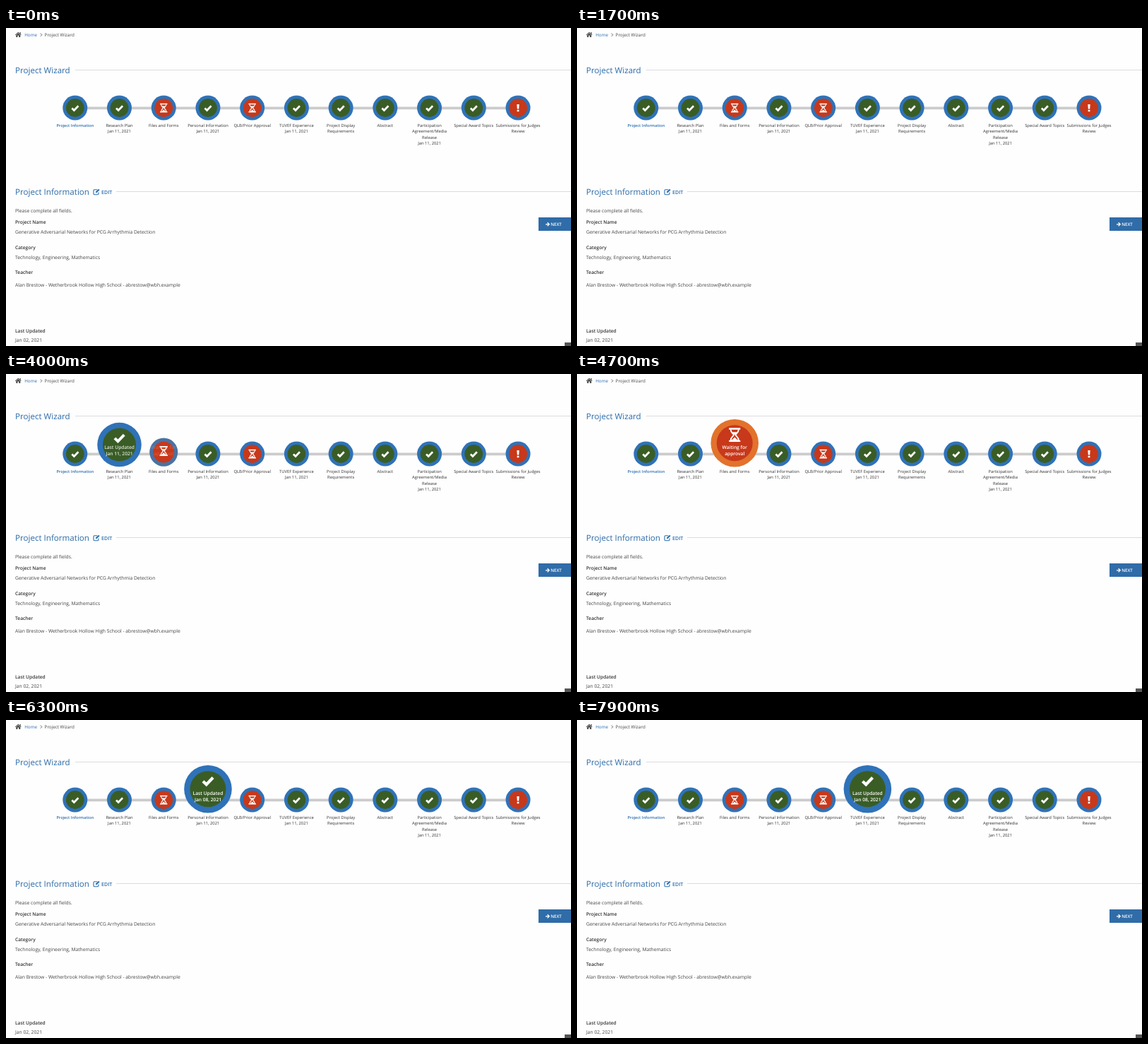
An HTML page for the animation above (8000 ms loop, 800 px wide and 450 px high).

```html
<!DOCTYPE html>
<html lang="en">
<head>
<meta charset="utf-8">
<title>Project Wizard</title>
<style>
  html, body { margin: 0; width: 100%; height: 100%; overflow: hidden; background: #fefefe; }
  svg { display: block; width: 800px; height: 450px; }
  text { font-family: "Open Sans", "Noto Sans", sans-serif; font-size: 6.75px; fill: #444; text-rendering: geometricPrecision; }
  .heading { font-size: 11.6px; fill: #2a6aa8; }
  .crumb { font-size: 6.3px; }
  .strong { font-weight: 600; font-size: 6.67px; fill: #333; }
  .label { font-size: 5.83px; text-anchor: middle; fill: #333; }
  .current { font-size: 5.6px; font-weight: 600; fill: #2a6db0; }
  .note { font-size: 6.67px; font-weight: 600; text-anchor: middle; fill: #fff; }
</style>
</head>
<body>
<svg id="stage" viewBox="0 0 800 450">
  <rect width="800" height="450" fill="#fefefe"/>

  <path d="M13 9.6L17.3 5.8L21.6 9.6L21 10.2L17.3 7L13.6 10.2ZM19.6 6H20.8V8.4L19.6 7.4ZM14.3 10.2L17.3 7.6L20.3 10.2V13H18.2V10.6H16.4V13H14.3Z" fill="#444"/>
  <text class="crumb" x="26.2" y="11.6" style="fill:#2a6db0">Home</text>
  <path d="M48.8 7.6L50.9 9.7L48.8 11.8" fill="none" stroke="#555" stroke-width=".9"/>
  <text class="crumb" x="54.6" y="11.6">Project Wizard</text>

  <path d="M98 59.5H800M156 231.5H800" stroke="#dcdce2"/>
  <text class="heading" x="13" y="63.8">Project Wizard</text>
  <text class="heading" x="13" y="235.8">Project Information</text>

  <g fill="none" stroke="#2a6db0" stroke-width="1.1">
    <path d="M129.4 228.8H125.2Q124 228.8 124 230V234.6Q124 235.8 125.2 235.8H129.8Q131 235.8 131 234.6V232.6"/>
    <path d="M127.3 232.7L131.9 228.4" stroke-width="2"/>
  </g>
  <text x="135" y="235.4" style="font-size:7.1px;font-weight:600;fill:#2a6db0">EDIT</text>

  <text x="13" y="260.5">Please complete all fields.</text>
  <text class="strong" x="13" y="277.4">Project Name</text>
  <text x="13" y="291.4">Generative Adversarial Networks for PCG Arrhythmia Detection</text>
  <text class="strong" x="13" y="312.6">Category</text>
  <text x="13" y="326.6">Technology, Engineering, Mathematics</text>
  <text class="strong" x="13" y="347.8">Teacher</text>
  <text x="13" y="365.6">Alan Brestow - Wetherbrook Hollow High School - abrestow@wbh.example</text>
  <text class="strong" x="13" y="431.4">Last Updated</text>
  <text x="13" y="443.6">Jan 02, 2021</text>

  <rect x="754" y="268" width="46" height="19" fill="#2f6ca8"/>
  <path d="M764 277.8H769M766.6 275.2L769.2 277.8L766.6 280.4" fill="none" stroke="#fff" stroke-width="1.3"/>
  <text x="771.2" y="280" style="font-size:6.15px;font-weight:600;fill:#fff">NEXT</text>
  <rect x="791" y="445" width="9" height="5" fill="#555"/>

  <path d="M98 113.4H725" stroke="#cbcbcb" stroke-width="3.6"/>
  <g id="steps"></g>
</svg>
<script>
const LOOP = 8000, FRAME = 100, GROW = 200;
const BLUE = [47, 114, 184], ORANGE = [226, 114, 44];
const FILL = { check: '#3a5d26', wait: '#c8381a', alert: '#c8381a' };
const ICON = {
  check: '<path d="M-4.5 .3L-1.4 3.3L4.6 -3" fill="none" stroke="#fff" stroke-width="2.7"/>',
  wait: '<g fill="none" stroke="#fff"><path d="M-5.2 -5.6H5.2M-5.2 5.6H5.2" stroke-width="1.5"/>' +
    '<path d="M-3.6 -5C-3.6 -1.8 -.9 -1.2 -.9 0S-3.6 1.8 -3.6 5M3.6 -5C3.6 -1.8 .9 -1.2 .9 0S3.6 1.8 3.6 5" stroke-width="1.2"/></g>' +
    '<path d="M-2.6 -2.6H2.6L0 0ZM-3 5L0 2.2L3 5Z" fill="#fff"/>',
  alert: '<path d="M-1.7 -5.2H1.7L1.2 1.4H-1.2ZM-1.4 2.5H1.4V5H-1.4Z" fill="#fff"/>'
};
const WAITING = ['Waiting for', 'approval'];
const updated = day => ['Last Updated', `Jan ${day}, 2021`];

// Each step: icon, label lines, text shown while enlarged, hover start and end.
const steps = [
  ['check', ['Project Information'], updated('02'), 1850, 2550],
  ['check', ['Research Plan', 'Jan 11, 2021'], updated('11'), 2550, 3950],
  ['wait', ['Files and Forms'], WAITING, 3950, 5150],
  ['check', ['Personal Information', 'Jan 11, 2021'], updated('08'), 5150, 6350],
  ['wait', ['QLB/Prior Approval'], WAITING, 6350, 7450],
  ['check', ['TUVEF Experience', 'Jan 11, 2021'], updated('08'), 7450, LOOP],
  ['check', ['Project Display', 'Requirements']],
  ['check', ['Abstract']],
  ['check', ['Participation', 'Agreement/Media', 'Release', 'Jan 11, 2021']],
  ['check', ['Special Award Topics']],
  ['alert', ['Submissions for Judges', 'Review']]
].map(([icon, label, note = [], start = Infinity, end = Infinity], i) =>
  ({ icon, label, note, start, end, x: 97.8 + 62.72 * i }));

const lines = (list, cls, x, y, gap) =>
  list.map((s, i) => `<text class="${cls}" x="${x}" y="${y + gap * i}">${s}</text>`).join('');

const root = document.getElementById('steps');
root.innerHTML = steps.map((s, i) =>
  lines(s.label, i ? 'label' : 'label current', s.x, 139.5, 8.65) +
  `<g class="step"><circle cx="${s.x}"/><circle cx="${s.x}" fill="${FILL[s.icon]}"/>` +
  `<g>${ICON[s.icon]}</g><g>${lines(s.note, 'note', s.x, 106, 8.7)}</g></g>`).join('');
root.querySelectorAll('.step').forEach((node, i) => { steps[i].parts = [...node.children]; });

const mix = (a, b, p) => a + (b - a) * p;
const ramp = (t, start) => {
  const u = Math.min(1, Math.max(0, (t - start) / GROW));
  return u * u * (3 - 2 * u);
};

function draw(t) {
  for (const s of steps) {
    const p = ramp(t, s.start) - ramp(t, s.end);
    const [ring, disc, icon, note] = s.parts;
    const color = s.icon === 'wait' ? BLUE.map((c, k) => Math.round(mix(c, ORANGE[k], p))) : BLUE;
    const cy = mix(113, 97.7, p);
    ring.setAttribute('cy', cy);
    ring.setAttribute('r', mix(17.5, 33.8, p));
    ring.setAttribute('fill', `rgb(${color})`);
    disc.setAttribute('cy', cy);
    disc.setAttribute('r', mix(12.9, 25.5, p));
    icon.setAttribute('transform', `translate(${s.x} ${mix(113.2, 86.2, p)}) scale(${mix(1, 1.55, p)})`);
    note.setAttribute('opacity', p);
  }
}

const origin = performance.now();
function tick() {
  const t = (performance.now() - origin) % LOOP;
  draw(Math.floor(t / FRAME) * FRAME);
  requestAnimationFrame(tick);
}
tick();
</script>
</body>
</html>
```
